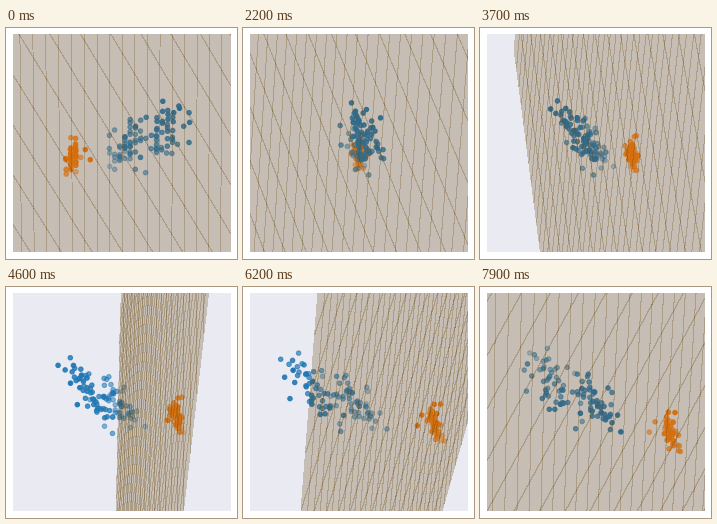
A matplotlib script for the animation above (8000 ms loop, 231 by 231 pixels).

```python
import numpy as np
import matplotlib.pyplot as plt
from matplotlib.animation import FuncAnimation
from matplotlib.collections import PolyCollection
from matplotlib.colors import to_rgb

SIZE, DPI = 231, 100
PX = 72 / DPI                           # one pixel in points
LEFT, TOP, SIDE = 7, 6, 218
FRAMES, INTERVAL, STEP = 80, 100, 2     # STEP: degrees per frame

ORIGIN = np.array([118.9, 112.0])
DIST = 1190.0
ELEV = np.radians(10)
# axes: petal length, petal width, sepal length
CENTER = np.array([3.95, 1.3, 6.1])
SCALE = np.array([21.0, 51.5, 25.8])

BACK = "#EAEAF2"
SHEET = (104 / 255, 71 / 255, 16 / 255, 0.27)

rng = np.random.default_rng(4)


def flowers(mean, sd, corr, extremes):
    """50 correlated measurements, bounded by a few extreme flowers."""
    extremes = np.array(extremes)
    n = 50 - len(extremes)
    a, b, c = corr
    chol = np.linalg.cholesky([[1, a, b], [a, 1, c], [b, c, 1]])
    noise = rng.standard_normal((n, 3))
    noise = (noise - noise.mean(0)) / noise.std(0)
    rest_mean = (50 * np.array(mean) - extremes.sum(0)) / n
    rest = rest_mean + 0.9 * np.array(sd) * (noise @ chol.T)
    rest = np.clip(rest, extremes.min(0), extremes.max(0))
    return np.round(np.vstack([extremes, rest]), 1)


setosa = flowers((1.46, 0.25, 5.0), (0.17, 0.09, 0.35), (0.33, 0.27, 0.28),
                 [(1.1, 0.1, 4.3), (1.2, 0.2, 5.8), (1.9, 0.6, 5.0)])
versicolor = flowers((4.26, 1.33, 5.94), (0.47, 0.20, 0.52), (0.79, 0.75, 0.55),
                     [(3.0, 1.0, 4.9), (4.7, 1.4, 7.0), (4.9, 1.8, 5.9)])
virginica = flowers((5.55, 2.03, 6.59), (0.55, 0.27, 0.64), (0.32, 0.86, 0.28),
                    [(4.5, 1.7, 4.9), (6.4, 2.0, 7.9), (6.9, 2.3, 7.7),
                     (6.0, 2.5, 6.3), (5.6, 1.4, 6.1)])


def project(points, azim):
    """Screen position and nearness of scaled points."""
    ca, sa = np.cos(azim), np.sin(azim)
    ce, se = np.cos(ELEV), np.sin(ELEV)
    x, y, z = np.moveaxis(points, -1, 0)
    ahead = x * ca + y * sa
    near = ahead * ce + z * se
    zoom = DIST / (DIST - near)
    right = (y * ca - x * sa) * zoom
    up = (z * ce - ahead * se) * zoom
    return np.stack([ORIGIN[0] + right, ORIGIN[1] - up], -1), near


# decision plane over a regular grid of petal lengths and widths
ticks = np.arange(-5, 5, 0.25)
gx, gy = np.meshgrid((ticks - CENTER[0]) * SCALE[0],
                     (ticks - CENTER[1]) * SCALE[1])
plane = np.stack([gx, gy, -318.7 - 9.7 * gx - 1.67 * gy], -1)

fig = plt.figure(figsize=(SIZE / DPI, SIZE / DPI), dpi=DPI, facecolor="white")
ax = fig.add_axes([LEFT / SIZE, 1 - (TOP + SIDE) / SIZE,
                   SIDE / SIZE, SIDE / SIZE], facecolor=BACK)
ax.set(xlim=(LEFT, LEFT + SIDE), ylim=(TOP + SIDE, TOP), xticks=[], yticks=[])
for spine in ax.spines.values():
    spine.set_visible(False)

clouds = []
for data, color in ((setosa, "#ff7f0e"),
                    (np.vstack([versicolor, virginica]), "#1f77b4")):
    dots = ax.scatter(data[:, 0], data[:, 1], s=(4.5 * PX) ** 2,
                      linewidths=PX, edgecolors="face")
    clouds.append((dots, (data - CENTER) * SCALE, to_rgb(color)))

# tiles overlap by a pixel at their seams, which shows as thin lines
tiles = PolyCollection([], facecolors=[SHEET], edgecolors="none",
                       linewidths=0, antialiaseds=False, zorder=5)
ax.add_collection(tiles, autolim=False)


def draw(i):
    azim = np.radians(STEP * i)
    for dots, points, rgb in clouds:
        pos, near = project(points, azim)
        order = np.argsort(near)
        pos, near = pos[order], near[order]
        # far dots fade
        alpha = 0.3 + 0.7 * (near - near[0]) / (near[-1] - near[0])
        dots.set_offsets(pos)
        dots.set_facecolor([(*rgb, a) for a in alpha])
        dots.set_zorder(3 + near[-1] / 1000)
    p = project(plane, azim)[0]
    quads = np.stack([p[:-1, :-1], p[:-1, 1:], p[1:, 1:], p[1:, :-1]], 2)
    tiles.set_verts(quads.reshape(-1, 4, 2))
    return []


anim = FuncAnimation(fig, draw, frames=FRAMES, interval=INTERVAL,
                     repeat=True, repeat_delay=0, blit=False)
plt.show()
```
